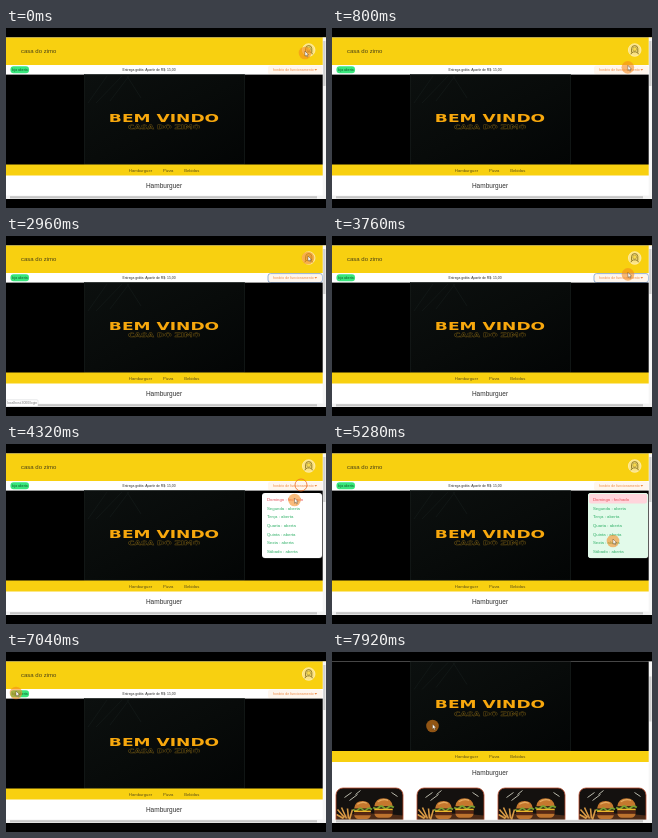
An HTML page that plays this animation: 320 by 180 pixels, repeating every 8000 ms.

```html
<!DOCTYPE html>
<html lang="pt">
<head>
<meta charset="utf-8">
<title>casa do zimo</title>
<style>
html, body { margin: 0; width: 100%; height: 100%; overflow: hidden; background: #000; }
svg { display: block; width: 100%; height: 100%; font-family: "Liberation Sans", Arial, sans-serif; }
.wide { font-family: "DejaVu Sans", sans-serif; font-weight: bold; text-anchor: middle; }
.mid { text-anchor: middle; }
</style>
</head>
<body>
<svg viewBox="0 0 320 180">
  <defs>
    <clipPath id="view"><rect y="9.5" width="320" height="161.5"/></clipPath>
    <clipPath id="photo"><rect x=".5" y=".5" width="67" height="45" rx="7"/></clipPath>
    <linearGradient id="glow" x2="1" y2="1">
      <stop stop-color="#0c100f"/><stop offset=".5" stop-color="#080b0a"/><stop offset="1" stop-color="#030505"/>
    </linearGradient>
    <g id="burger">
      <path d="M-8 -1Q-7 -8 0 -8T8 -1Z" fill="#c5782e"/>
      <path d="M-5 -5Q0 -8 4 -6" fill="none" stroke="#e6aa60"/>
      <path d="M-9 0Q-6 2 -4 0T0 0T4 0T9 0" fill="none" stroke="#78a22f" stroke-width="1.6"/>
      <rect x="-8" y="1" width="16" height="1.5" fill="#efb52c"/>
      <rect x="-8" y="2.5" width="16" height="3" rx="1" fill="#582713"/>
      <path d="M-8 5.5H8Q7 9 4 9H-4Q-7 9 -8 5.5Z" fill="#bd722d"/>
    </g>
    <g id="card">
      <g clip-path="url(#photo)">
        <rect width="68" height="46" fill="#14110f"/>
        <path d="M0 28Q35 24 68 28V46H0Z" fill="#4b2b18"/>
        <path d="M9 10l7-5M14 13l8-6M20 7l5-4M56 5l6 4" stroke="#b9b9ac"/>
        <path d="M2 22l7 8M6 20l5 11M12 21l1 10M17 22l-3 10M1 27l7 4" stroke="#d89a45" stroke-width="1.6"/>
        <use href="#burger" transform="translate(27 22) scale(1.05)"/>
        <use href="#burger" transform="translate(48 20) scale(1.15)"/>
      </g>
      <rect x=".5" y=".5" width="67" height="45" rx="7" fill="none" stroke="#b8492a" stroke-width=".8"/>
    </g>
  </defs>
  <rect width="320" height="180"/>
  <g clip-path="url(#view)">
    <g id="page">
      <rect y="9" width="320" height="240" fill="#fff"/>
      <rect y="9" width="320" height="28" fill="#f8d010"/>
      <text x="15" y="25" font-size="6" fill="#4a4218">casa do zimo</text>
      <circle cx="302.7" cy="22" r="6.3" fill="#fbe384" stroke="#fff3c0" stroke-width=".7"/>
      <g fill="none" stroke="#85701c" stroke-width=".9">
        <path d="M299.6 24.5V20.5Q299.8 17.6 302.7 17.6T305.8 20.5V24.5"/>
        <circle cx="302.7" cy="21" r="2" fill="#f8d94c" stroke-width=".4"/>
        <path d="M298.8 26.3Q299.6 24.2 301.6 23.9H303.8Q305.8 24.2 306.6 26.3"/>
      </g>

      <rect x="4.5" y="38.2" width="18.5" height="7" rx="3" fill="#38e77c"/>
      <text class="mid" x="13.7" y="43" font-size="3.4" fill="#12552c">loja aberta</text>
      <text class="mid" x="143" y="43.2" font-size="3.4" fill="#282828">Entrega grátis: Apartir de R$: 15,00</text>
      <rect x="262" y="37.6" width="54.5" height="8.9" rx="2.5" fill="#fff6ed"/>
      <rect id="focus" x="262" y="37.6" width="54.5" height="8.9" rx="2.5" fill="none" stroke="#7d9fcd" stroke-width=".8"/>
      <text x="267" y="43.2" font-size="3.6" fill="#ee8942">horário de funcionamento</text>
      <path d="M308.5 41h2.6l-1.3 1.8z" fill="#ee8942"/>

      <rect y="46.6" width="320" height="90.4"/>
      <rect x="78.5" y="46.6" width="160" height="89.6" fill="url(#glow)" stroke="#1b2220" stroke-width=".6"/>
      <path d="M82 75L101 48M90 75L116 48M104 73L123 48M121 48L135 70" stroke="#141a18" stroke-width=".8"/>
      <text class="wide" transform="translate(158 93.7) scale(1.66 1)" font-size="10.3" fill="#f8a80d">BEM VINDO</text>
      <text class="wide" transform="translate(158 101.2) scale(1.5 1)" font-size="5.8" fill="none" stroke="#6b5212" stroke-width=".35">CASA DO ZIMO</text>

      <rect y="136.5" width="320" height="11" fill="#f8d010"/>
      <g class="mid" font-size="4.2" fill="#5a4e18">
        <text x="134.5" y="143.6">Hamburguer</text>
        <text x="162.2" y="143.6">Pizza</text>
        <text x="185.7" y="143.6">Bebidas</text>
      </g>
      <text class="mid" x="158" y="160" font-size="6.5" fill="#303030">Hamburguer</text>
      <g id="cards"></g>

      <g id="menu">
        <rect x="256.5" y="49.5" width="60" height="65" rx="3" fill="#9a9a9a" opacity=".35"/>
        <rect x="256" y="49" width="60" height="65" rx="3" fill="#fff"/>
        <g id="tint">
          <rect x="256" y="49" width="60" height="65" rx="3" fill="#e2faea"/>
          <rect x="257" y="50" width="58" height="9.5" rx="2" fill="#ffd5dc"/>
        </g>
        <g id="days" font-size="4.3"></g>
      </g>
    </g>
    <rect x="316.7" y="9" width="3.3" height="162" fill="#f6f6f6"/>
    <rect id="thumb" x="317.2" y="13" width="2.3" height="45" fill="#cfcfcf"/>
    <rect y="167.6" width="320" height="3.4" fill="#f1f1f1"/>
    <rect x="4" y="168.2" width="307" height="2.2" fill="#c4c4c4"/>
    <g id="status">
      <rect x="0" y="163.8" width="32" height="6.6" rx="1" fill="#fff" stroke="#c5c8cb" stroke-width=".4"/>
      <text x="1.2" y="168.3" font-size="3.4" fill="#777">localhost:3000/login</text>
    </g>
  </g>
  <circle id="ring" r="6" fill="none" stroke="#ee6b20" stroke-width=".8"/>
  <g id="cursor">
    <circle r="6.3" fill="#f58a1c" opacity=".58"/>
    <path d="M0 -2V3.2L1.2 2.1L2 4L2.8 3.6L2 1.8H3.6Z" fill="#fff" stroke="#4c3312" stroke-width=".4"/>
  </g>
</svg>
<script>
const LOOP = 8000, STEP = 80;
const $ = id => document.getElementById(id);
const clamp = v => Math.min(1, Math.max(0, v));
const ease = v => v * v * (3 - 2 * v);
const ramp = (t, a, b) => ease(clamp((t - a) / (b - a)));
const show = (id, v) => $(id).setAttribute('opacity', +v);
const move = (id, x, y) => $(id).setAttribute('transform', `translate(${x} ${y})`);

const week = ['Domingo', 'Segunda', 'Terça', 'Quarta', 'Quinta', 'Sexta', 'Sábado'];
$('days').innerHTML = week.map((day, i) =>
  `<text x="261" y="${56.8 + i * 8.7}" fill="${i ? '#2caf65' : '#e64a55'}">${day} : ${i ? 'aberta' : 'fechado'}</text>`).join('');
$('cards').innerHTML = [0, 1, 2, 3].map(i =>
  `<use href="#card" x="${3.5 + i * 81}" y="173"/>`).join('');

// time, x, y
const path = [
  [0, 299, 25], [400, 303, 25], [900, 295, 41], [1200, 295, 41],
  [1680, 288.5, 27], [2400, 302, 22], [3300, 302, 22], [3900, 295, 41],
  [4160, 295, 41], [4320, 288.5, 56], [5280, 281, 97], [5920, 295, 42],
  [6160, 295, 42], [6880, 10, 41], [7120, 10, 41], [7600, 100.5, 74], [LOOP, 100.5, 74]
];
const clicks = [1000, 4160, 6080];

function cursorAt(t) {
  const i = path.findIndex(p => p[0] > t);
  const [a, x, y] = path[i - 1], [b, u, v] = path[i];
  const k = ramp(t, a, b);
  return [x + (u - x) * k, y + (v - y) * k];
}

function draw(t) {
  const scroll = ramp(t, 7600, 7900);
  move('page', 0, -37.5 * scroll);
  move('thumb', 0, 11.5 * scroll);
  move('cursor', ...cursorAt(t));
  show('focus', t >= 1040 && t < 4080);
  show('status', t >= 2480 && t < 3440);
  show('menu', ramp(t, 4120, 4280) - ramp(t, 6080, 6240));
  show('tint', ramp(t, 4320, 4960));
  const click = clicks.find(c => t >= c && t < c + 240);
  show('ring', click !== undefined);
  if (click !== undefined) {
    move('ring', ...cursorAt(click));
    $('ring').setAttribute('r', 4 + 2 * clamp((t - click) / 160));
  }
}

const start = performance.now();
function tick() {
  const t = (performance.now() - start) % LOOP;
  draw(Math.floor(t / STEP) * STEP);
  requestAnimationFrame(tick);
}
tick();
</script>
</body>
</html>
```
